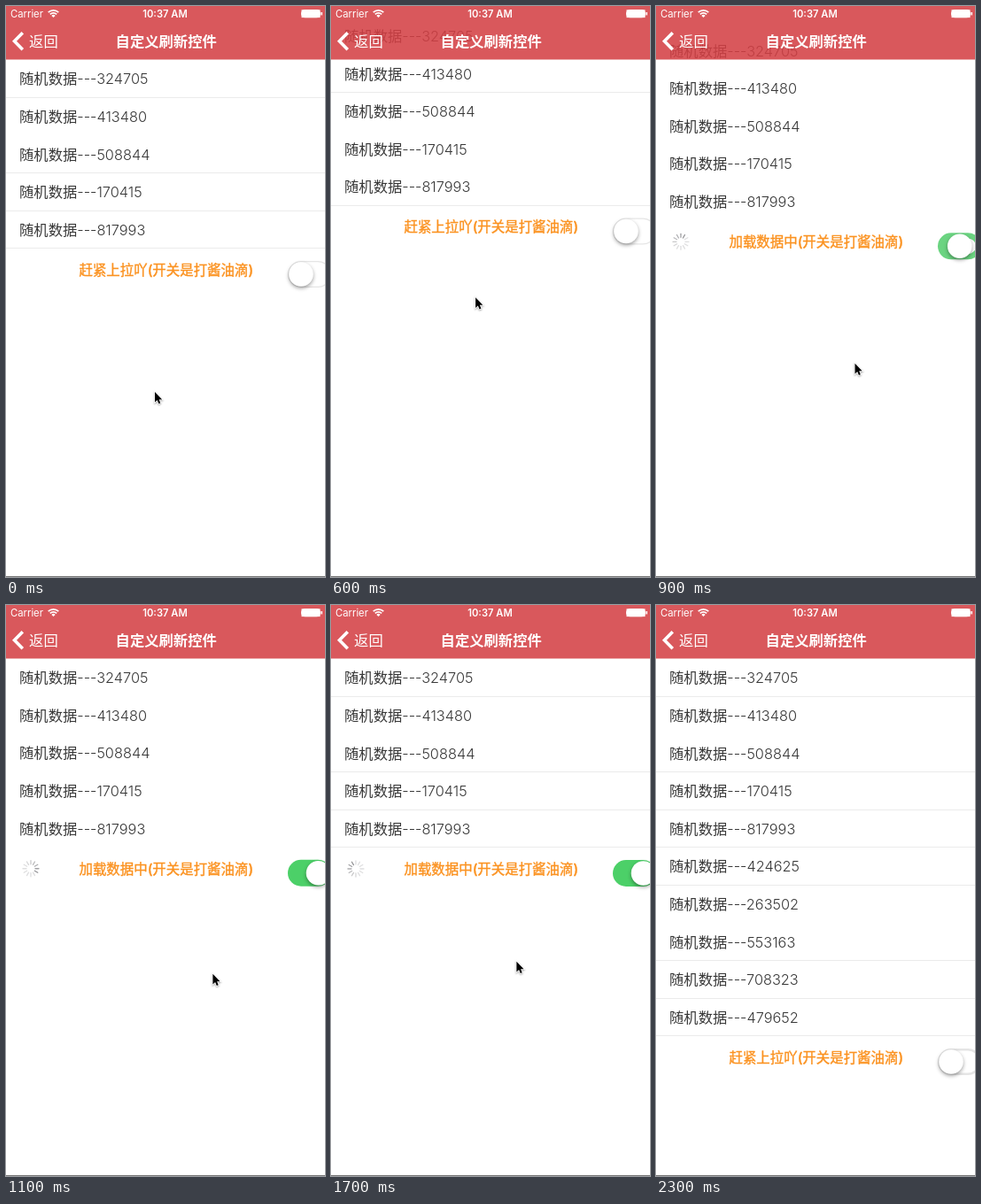
These frames come from a looping animation (360x645 px, 2.4 s). An HTML page with a canvas:

```html
<!DOCTYPE html>
<html lang="zh-CN">
<head>
<meta charset="utf-8">
<style>
  html, body { margin: 0; width: 100%; height: 100%; overflow: hidden; background: #fff; }
  canvas { display: block; }
</style>
</head>
<body>
<canvas id="stage" width="360" height="645"></canvas>
<script>
const ctx = document.getElementById('stage').getContext('2d');
const FONT = 'Inter, "Noto Sans CJK SC", "Noto Sans CJK", sans-serif';
const LOOP = 2400, STEP = 100;
const HEADER = 60.5, LIST_TOP = 60.8, ROW = 42.6, PULL = 56;
const DRAG_START = 400, DRAG_END = 700, LOAD_START = 800, LOAD_END = 2200, POINTER_END = 1800;
const values = '324705 413480 508844 170415 817993 424625 263502 553163 708323 479652'.split(' ');

const mix = (a, b, p) => a + (b - a) * p;
const ramp = (t, start, end) => Math.min(1, Math.max(0, (t - start) / (end - start)));
const dragAt = t => PULL * Math.sin(ramp(t, DRAG_START, DRAG_END) * Math.PI / 2);

// The list follows the drag, then springs back along a bell curve.
function scrollAt(t) {
  const sinceRelease = Math.max(0, t - 805);
  return dragAt(t) * Math.exp(-((sinceRelease / 126) ** 2));
}

// Drag up, swing down to the right, then drift back a little.
function pointerAt(t) {
  const drag = dragAt(t);
  const swing = 1 - (1 - ramp(t, DRAG_END, 1100)) ** 3;
  const drift = ramp(t, 1100, 1400);
  return [168 - drag * 0.1 + swing * 71 - drift * 24, 436 - drag * 2.2 + swing * 104 - drift * 14];
}

function text(str, x, y, size, { weight = 400, color = '#fff', align = 'left', embolden = 0 } = {}) {
  ctx.font = `${weight} ${size}px ${FONT}`;
  ctx.fillStyle = ctx.strokeStyle = color;
  ctx.textAlign = align;
  ctx.fillText(str, x, y);
  if (embolden) {
    ctx.lineWidth = embolden;
    ctx.strokeText(str, x, y);
  }
}

function line(width, ...points) {
  ctx.lineWidth = width;
  ctx.beginPath();
  for (const [x, y] of points) ctx.lineTo(x, y);
  ctx.stroke();
}

function pill(cx, cy, halfW, halfH, color) {
  ctx.fillStyle = color;
  ctx.beginPath();
  ctx.roundRect(cx - halfW, cy - halfH, halfW * 2, halfH * 2, halfH);
  ctx.fill();
}

function drawRows(count, scroll, t) {
  const still = scroll < 0.1, dragging = t < DRAG_END;
  for (let i = 0; i < count; i++) {
    const top = LIST_TOP + i * ROW - scroll;
    text('随机数据---' + values[i], 15, top + 27.6, 16.32, { weight: 300, color: '#383838' });
    // Some hairlines fall between pixels and vanish.
    if (still ? i % 5 !== 1 : dragging && i % 3 === 1) {
      ctx.fillStyle = '#ebebeb';
      ctx.fillRect(0, Math.floor(top + ROW), 360, 1);
    }
  }
}

function drawSpinner(cx, cy, t) {
  const head = Math.floor(((t - 1100) * 0.36 + 120) / 30);
  ctx.lineCap = 'round';
  for (let i = 0; i < 12; i++) {
    const age = (head - i + 24) % 12;
    const angle = i * Math.PI / 6, dx = Math.sin(angle), dy = -Math.cos(angle);
    ctx.strokeStyle = `rgba(90,90,95,${Math.max(0.2, 0.65 - age * 0.08)})`;
    line(1.3, [cx + dx * 5, cy + dy * 5], [cx + dx * 9, cy + dy * 9]);
  }
  ctx.lineCap = 'butt';
}

function drawSwitch(cy, t) {
  const on = ramp(t, LOAD_START, 1000) - ramp(t, 2100, 2300);
  const fill = ramp(t, LOAD_START, 1000) ** 1.5 - ramp(t, 2100, 2320);
  const tint = Math.min(1, on * 1.6);
  const rgb = [76, 208, 104].map(c => Math.round(mix(229, c, tint)));
  pill(342.5, cy, 24.5, 15, `rgb(${rgb})`);
  pill(mix(342.5, 352, fill), cy, 23.2 * (1 - fill), 13.7 * (1 - fill), '#fff');

  ctx.save();
  ctx.shadowColor = 'rgba(0,0,0,.38)';
  ctx.shadowBlur = 4;
  ctx.shadowOffsetY = 2;
  pill(mix(333, 352.5, on), cy, 13.8, 13.8, '#fff');
  ctx.restore();
}

function drawFooter(y, t) {
  const loading = t >= LOAD_START && t < LOAD_END;
  const label = loading ? '加载数据中' : '赶紧上拉吖';
  text(label + '(开关是打酱油滴)', 180.8, y + 30, 15.45,
    { weight: 500, color: '#fb9220', align: 'center', embolden: 0.4 });
  if (loading) drawSpinner(28, y + 24.2, t);
  drawSwitch(y + 29.2, t);
}

function wifiArc(radius) {
  ctx.beginPath();
  ctx.arc(53.5, 13, radius, -Math.PI * 0.75, -Math.PI * 0.25);
}

function drawHeader() {
  ctx.fillStyle = 'rgba(212,64,68,.87)';
  ctx.fillRect(0, 0, 360, HEADER);
  text('Carrier', 5, 13, 11.3);
  text('10:37 AM', 179.5, 13, 11.2, { weight: 600, align: 'center' });
  text('返回', 26.1, 46, 16.32);
  text('自定义刷新控件', 180.7, 46, 16.32, { weight: 700, align: 'center' });

  ctx.strokeStyle = ctx.fillStyle = '#fff';
  line(3.6, [18.8, 30.3], [9.5, 39.8], [18.8, 49.3]);
  ctx.lineWidth = 1.7;
  for (const radius of [5.2, 8.2]) {
    wifiArc(radius);
    ctx.stroke();
  }
  wifiArc(3);
  ctx.lineTo(53.5, 13);
  ctx.fill();
  pill(344, 8.7, 11, 4.6, '#fff');
  ctx.fillRect(333.5, 4.3, 21, 8.8);
  ctx.fillRect(355.5, 7, 1.5, 3.4);
}

function drawPointer([x, y]) {
  const arrow = new Path2D('M0 0V11.6L2.7 9.2 4.4 13.2 6.3 12.4 4.7 8.5H8.2Z');
  ctx.save();
  ctx.translate(x, y);
  ctx.shadowColor = 'rgba(0,0,0,.35)';
  ctx.shadowBlur = 2;
  ctx.shadowOffsetY = 1;
  ctx.strokeStyle = '#fff';
  ctx.lineWidth = 1.6;
  ctx.stroke(arrow);
  ctx.shadowColor = 'transparent';
  ctx.fillStyle = '#000';
  ctx.fill(arrow);
  ctx.restore();
}

function draw(t) {
  const scroll = scrollAt(t);
  const count = t >= LOAD_END ? 10 : 5;
  ctx.fillStyle = '#fff';
  ctx.fillRect(0, 0, 360, 645);
  drawRows(count, scroll, t);
  drawFooter(LIST_TOP + count * ROW - scroll, t);
  drawHeader();
  ctx.fillStyle = '#777';
  ctx.fillRect(0, 644, 360, 1);
  if (t < POINTER_END) drawPointer(pointerAt(t));
}

function tick() {
  const t = performance.now() % LOOP;
  draw(Math.floor(t / STEP) * STEP);
  requestAnimationFrame(tick);
}
tick();
</script>
</body>
</html>
```
